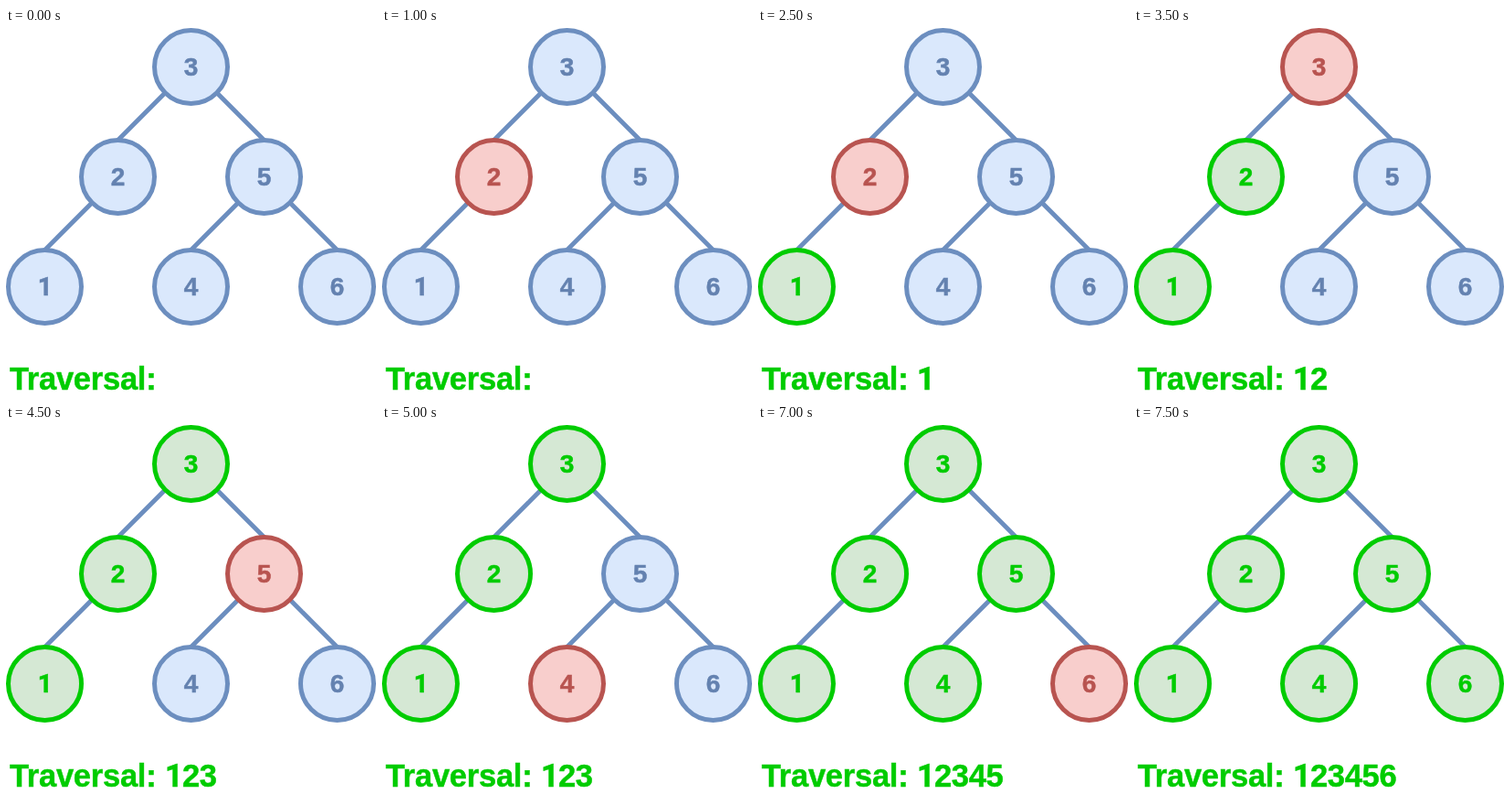
Animation, 405 px wide and 403 px high, one loop 8000 ms. Source, as an HTML page:

```html
<!DOCTYPE html>
<html lang="en">
<head>
<meta charset="utf-8">
<title>In-order traversal</title>
<style>
  html, body { margin: 0; width: 100%; height: 100%; overflow: hidden; background: #fff; }
  svg { display: block; width: 405px; height: 403px; }
  text {
    font: bold 28px "Liberation Sans", Arial, sans-serif;
    fill: var(--ink); stroke: var(--ink); stroke-width: 0.5;
  }
  .one { font-family: Roboto, Arial, sans-serif; }
  .caption { --ink: #00cc00; font-size: 34.5px; letter-spacing: -0.25px; }
  line { stroke: #6c8ebf; stroke-width: 5; }
  circle { fill: var(--fill); stroke: var(--line); stroke-width: 5; }
  .idle { --fill: #dae8fc; --line: #6c8ebf; --ink: #6482b0; }
  .visit { --fill: #f8cecc; --line: #b85450; --ink: #b85450; }
  .done { --fill: #d5e8d4; --line: #00cc00; --ink: #00cc00; }
</style>
</head>
<body>
<svg id="stage" viewBox="0 0 405 403"></svg>
<script>
const STEP = 500;
const R = 40;
const DIGIT = 0.556; // digit advance in em
const BASELINE = 394.5;
const stage = document.getElementById('stage');

// Binary search tree: each child sits one level down, to the left or right
function insert(node, value, x = 202.5, y = 42.5) {
  if (!node) return { value, x, y };
  const side = value < node.value ? 'left' : 'right';
  const dx = side === 'left' ? -2 * R : 2 * R;
  node[side] = insert(node[side], value, node.x + dx, node.y + 3 * R);
  return node;
}
const root = [3, 2, 5, 1, 4, 6].reduce(insertValue, null);
function insertValue(node, value) { return insert(node, value); }

// In-order walk, recording the visited node and the finished count per step
const order = [];
const steps = [{ current: null, done: 0 }];
function walk(node) {
  const mark = current => steps.push({ current, done: order.length });
  mark(node);
  if (node.left) {
    walk(node.left);
    mark(node);
  }
  order.push(node);
  mark(null);
  if (node.right) walk(node.right);
}
walk(root);

function add(parent, tag, attrs, text) {
  const el = document.createElementNS('http://www.w3.org/2000/svg', tag);
  for (const key in attrs) el.setAttribute(key, attrs[key]);
  if (text) el.textContent = text;
  return parent.appendChild(el);
}

// The figure 1 is set in a face whose 1 has no foot
function addDigit(parent, value, x, y, cls = '') {
  const face = value === 1 ? ' one' : '';
  return add(parent, 'text', { x, y, class: cls + face }, String(value));
}

function addEdge(from, to) {
  const d = R * Math.SQRT1_2;
  add(stage, 'line', {
    x1: from.x + Math.sign(to.x - from.x) * d, y1: from.y + d,
    x2: to.x, y2: to.y - R
  });
}

for (const node of order) {
  for (const child of [node.left, node.right]) if (child) addEdge(node, child);
}

add(stage, 'text', { x: 3.9, y: BASELINE, class: 'caption' }, 'Traversal:');
order.forEach((node, i) => {
  const { x, y, value } = node;
  node.group = add(stage, 'g', {});
  add(node.group, 'circle', { cx: x, cy: y, r: R });
  addDigit(node.group, value, x - 28 * DIGIT / 2, y + 9.5);
  node.digit = addDigit(stage, value, 174 + i * 34 * DIGIT, BASELINE, 'caption');
});

function draw(time) {
  const { current, done } = steps[Math.floor(time / STEP) % steps.length];
  order.forEach((node, i) => {
    const state = i < done ? 'done' : node === current ? 'visit' : 'idle';
    node.group.setAttribute('class', state);
    node.digit.setAttribute('visibility', i < done ? 'visible' : 'hidden');
  });
}

const start = performance.now();
function tick() {
  draw(performance.now() - start);
  requestAnimationFrame(tick);
}
tick();
</script>
</body>
</html>
```
